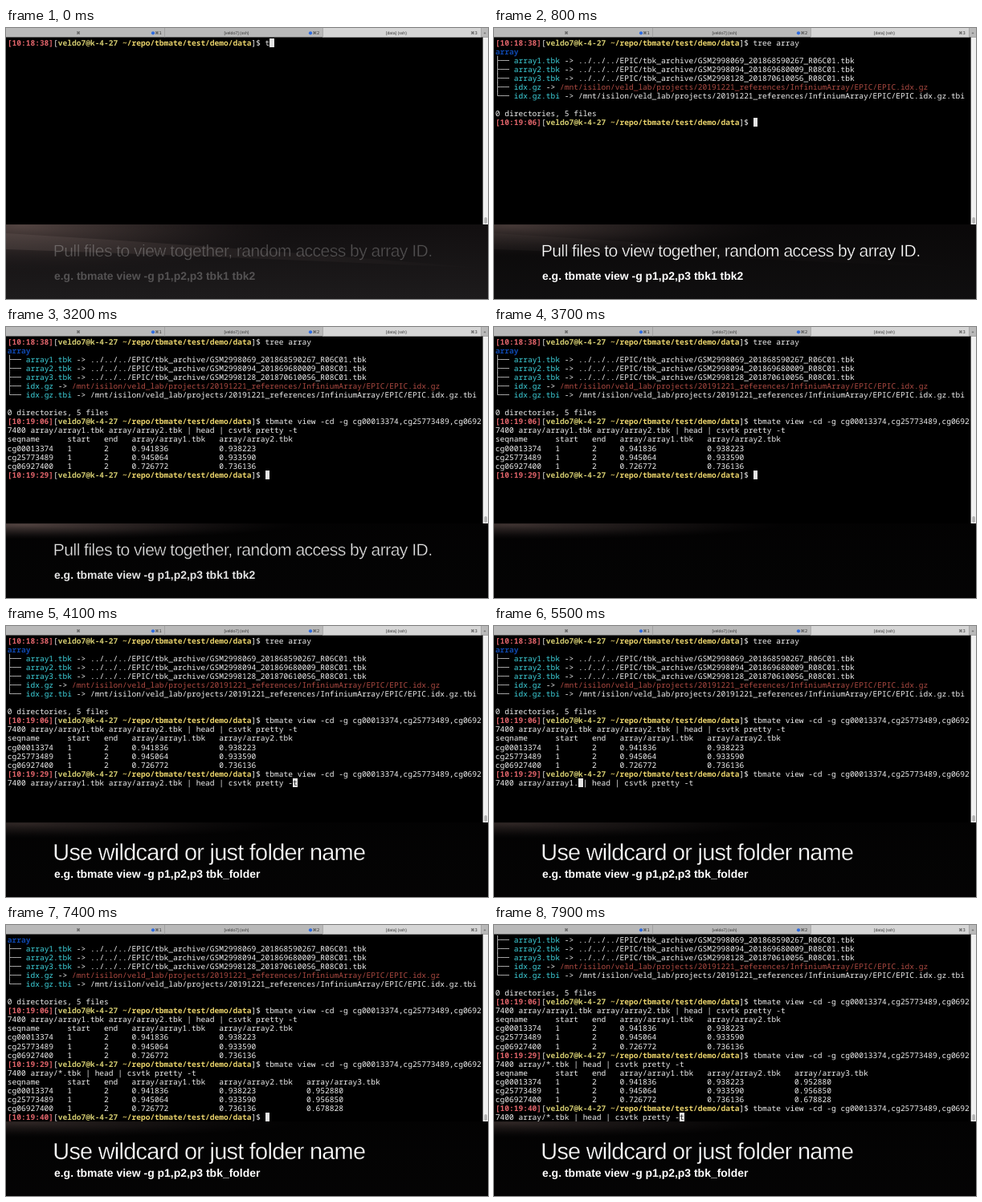
These frames come from a looping animation (600 px wide and 338 px high, 8 s). An HTML page:

```html
<!DOCTYPE html>
<html lang="en">
<head>
<meta charset="utf-8">
<title>Terminal demo</title>
<style>
html, body { margin: 0; width: 100%; height: 100%; overflow: hidden; background: #000; }
svg, pre { position: absolute; left: 0; top: 0; text-rendering: geometricPrecision; }
svg { width: 600px; height: 338px; font-family: "Liberation Sans", Arial, sans-serif; }
pre {
  left: 1.8px; top: 12.6px; width: 591px; height: 232.4px; margin: 0; overflow: hidden;
  font: 500 9.55px/11.08px "Noto Sans Mono", "DejaVu Sans Mono", monospace; color: #f0f0f0;
}
pre b.time { color: #e0646a; }
pre b.user { color: #d3cb70; }
pre b.path { color: #ecd56c; }
pre b.dir { color: #0f47ad; }
pre .link { color: #3ed2dc; }
pre .dead { color: #ad4a42; }
pre u { text-decoration: none; background: #e4e4e4; color: #222; display: inline-block; height: 11.08px; vertical-align: top; }
.tab { font-size: 5.2px; fill: #333; text-anchor: middle; }
.key { font-family: "DejaVu Sans", sans-serif; }
.title { fill: #fff; stroke: #080606; stroke-width: .35px; letter-spacing: -.025em; }
.sub { fill: #fff; font-size: 13.95px; font-weight: bold; }
</style>
</head>
<body>
<svg viewBox="0 0 600 338">
  <defs>
    <radialGradient id="soft">
      <stop offset="0" stop-color="#5a4a47"/>
      <stop offset=".5" stop-color="#3a302f" stop-opacity=".6"/>
      <stop offset="1" stop-color="#1c1718" stop-opacity="0"/>
    </radialGradient>
    <linearGradient id="haze" x2="0" y2="1">
      <stop offset="0" stop-color="#120f10"/>
      <stop offset="1" stop-color="#1d1b1c"/>
    </linearGradient>
    <linearGradient id="beam">
      <stop offset="0" stop-color="#6b5c59" stop-opacity=".3"/>
      <stop offset="1" stop-color="#6b5c59" stop-opacity="0"/>
    </linearGradient>
  </defs>
  <rect y="245" width="600" height="93" fill="url(#haze)" id="base"/>
  <ellipse cx="20" cy="247" rx="340" fill="url(#soft)" id="glow"/>
  <path d="M0 256Q300 274 600 300Q300 286 0 276Z" fill="url(#beam)" id="streak"/>
  <rect width="600" height="245"/>
  <rect width="600" height="11.5" fill="#b9b9b9"/>
  <rect x="394" width="197.5" height="11.5" fill="#d6d6d6"/>
  <path d="M197.5 0V11.5M394.5 0V11.5M591.5 0V11.5" stroke="#999" stroke-width=".7"/>
  <rect x="593.6" y="11.5" width="6.4" height="233.5" fill="#f1f1f1"/>
  <rect x="595.3" y="236" width="3.6" height="8" rx="1.8" fill="#b4b4b4"/>
  <circle cx="183" cy="6.3" r="2.1" fill="#2d6be0"/>
  <circle cx="379" cy="6.3" r="2.1" fill="#2d6be0"/>
  <g class="tab">
    <text x="287" y="8.2">[veldo7] (ssh)</text>
    <text x="486" y="8.2">[data] (ssh)</text>
    <text x="596" y="8.2">+</text>
    <g class="key">
      <text x="90" y="8.2">⌘</text>
      <text x="189.5" y="8.2">⌘1</text>
      <text x="386" y="8.2">⌘2</text>
      <text x="582.5" y="8.2">⌘3</text>
    </g>
  </g>
  <g id="first">
    <text class="title" x="58.8" y="284.8" font-size="21.06">Pull files to view together, random access by array ID.</text>
    <text class="sub" x="60" y="314">e.g. tbmate view -g p1,p2,p3 tbk1 tbk2</text>
  </g>
  <g id="second">
    <text class="title" x="58.3" y="292.4" font-size="28.85">Use wildcard or just folder name</text>
    <text class="sub" x="60" y="314">e.g. tbmate view -g p1,p2,p3 tbk_folder</text>
  </g>
</svg>
<pre id="term"></pre>
<script>
const $ = id => document.getElementById(id);
const LOOP = 8000, ROWS = 21, WRAP = 47;

// Linear interpolation through [time, value] pairs
function key(t, ...points) {
  let [t0, v0] = points[0];
  for (const [t1, v1] of points) {
    if (t < t1) return t1 === t0 ? v1 : v0 + (v1 - v0) * Math.max(0, t - t0) / (t1 - t0);
    [t0, v0] = [t1, v1];
  }
  return v0;
}
const step = (t, ...points) => Math.round(key(t, ...points));

// Prompt and command, wrapped at the window edge, with an optional block cursor
function prompt(time, text, cursor = -1) {
  const cells = [...text + (cursor === text.length ? ' ' : '')].map((c, i) =>
    (i === WRAP ? '\n' : '') + (i === cursor ? `<u>${c}</u>` : c));
  return `<b class="time">[${time}]</b>[<b class="user">veldo7@k-4-27</b> ` +
    `<b class="path">~/repo/tbmate/test/demo/data</b>]$ ` + cells.join('');
}

const entry = (name, path, dead = '') =>
  `── <span class="link">${name}</span> -&gt; <span class="${dead}">${path}</span>`;
const sample = (n, id) => '├' + entry(`array${n}.tbk`, `../../../EPIC/tbk_archive/GSM${id}.tbk`);
const index = '/mnt/isilon/veld_lab/projects/20191221_references/InfiniumArray/EPIC/EPIC.idx.gz';
const tree = [
  '<b class="dir">array</b>',
  sample(1, '2998069_201868590267_R06C01'),
  sample(2, '2998094_201869680009_R08C01'),
  sample(3, '2998128_201870610056_R08C01'),
  '├' + entry('idx.gz', index, 'dead'),
  '└' + entry('idx.gz.tbi', index + '.tbi'),
  '', '0 directories, 5 files'
].join('\n');

const values = [
  ['cg00013374', '0.941836', '0.938223', '0.952880'],
  ['cg25773489', '0.945064', '0.933590', '0.956850'],
  ['cg06927400', '0.726772', '0.736136', '0.678828']
];
function table(n) {
  const names = [1, 2, 3].map(i => `array/array${i}.tbk`);
  const row = (id, start, end, cols) => id.padEnd(13) + start.padEnd(8) + end.padEnd(6) +
    cols.slice(0, n).map(c => c.padEnd(19)).join('').trimEnd();
  return [row('seqname', 'start', 'end', names),
    ...values.map(([id, ...cols]) => row(id, '1', '2', cols))].join('\n');
}

const list = 'tree array';
const select = 'tbmate view -cd -g cg00013374,cg25773489,cg06927400 array/';
const pipe = ' | head | csvtk pretty -t';
const pair = select + 'array1.tbk array/array2.tbk' + pipe;
const wild = select + '*.tbk' + pipe;
const END = pair.length, FILES = END - pipe.length;

function screen(t) {
  const out = [];
  const done = (time, text, result) => out.push(prompt(time, text), result);
  const live = (time, text, cursor) => {
    out.push(prompt(time, text, cursor));
    return out.join('\n').split('\n').slice(-ROWS).join('\n');
  };
  const typing = (time, text, n) => live(time, text.slice(0, n), n);

  if (t < 800) return typing('10:18:38', list, step(t, [0, 1], [600, list.length]));
  done('10:18:38', list, tree);

  if (t < 2900) return typing('10:19:06', pair, step(t, [1000, 0], [2200, 80], [2700, END]));
  done('10:19:06', pair, table(2));

  if (t < 3800) return live('10:19:29', '', 0);
  if (t < 7000) {
    // Recall, walk back to the file names, erase them, type the wildcard
    const at = step(t, [4000, END], [4100, END - 1], [4500, FILES], [4700, FILES],
      [5500, 65], [5900, 65], [6300, select.length]);
    const head = pair.slice(0, at) + '*.tbk'.slice(0, step(t, [6300, 0], [6700, 5]));
    return live('10:19:29', head + pair.slice(Math.max(at, FILES)), head.length);
  }
  done('10:19:29', wild, table(3));

  if (t < 7600) return live('10:19:40', '', 0);
  return live('10:19:40', wild, wild.length - (t >= 7900));
}

let last = -1;
function draw(t) {
  $('term').innerHTML = screen(t);
  $('first').setAttribute('opacity', key(t, [0, .25], [800, 1], [3150, 1], [3600, 0]));
  $('second').setAttribute('opacity', key(t, [3700, 0], [4000, 1]));
  $('base').setAttribute('opacity', key(t, [0, 1], [1500, .15]));
  $('glow').setAttribute('ry', key(t, [0, 60], [1500, 18]));
  $('glow').setAttribute('opacity', key(t, [0, .9], [1500, .6], [3200, .9], [4100, .5]));
  $('streak').setAttribute('opacity', key(t, [0, 1], [1200, 0]));
}
function tick(now) {
  const t = Math.floor(now % LOOP / 100) * 100;
  if (t !== last) draw(last = t);
  requestAnimationFrame(tick);
}
draw(0);
requestAnimationFrame(tick);
</script>
</body>
</html>
```
